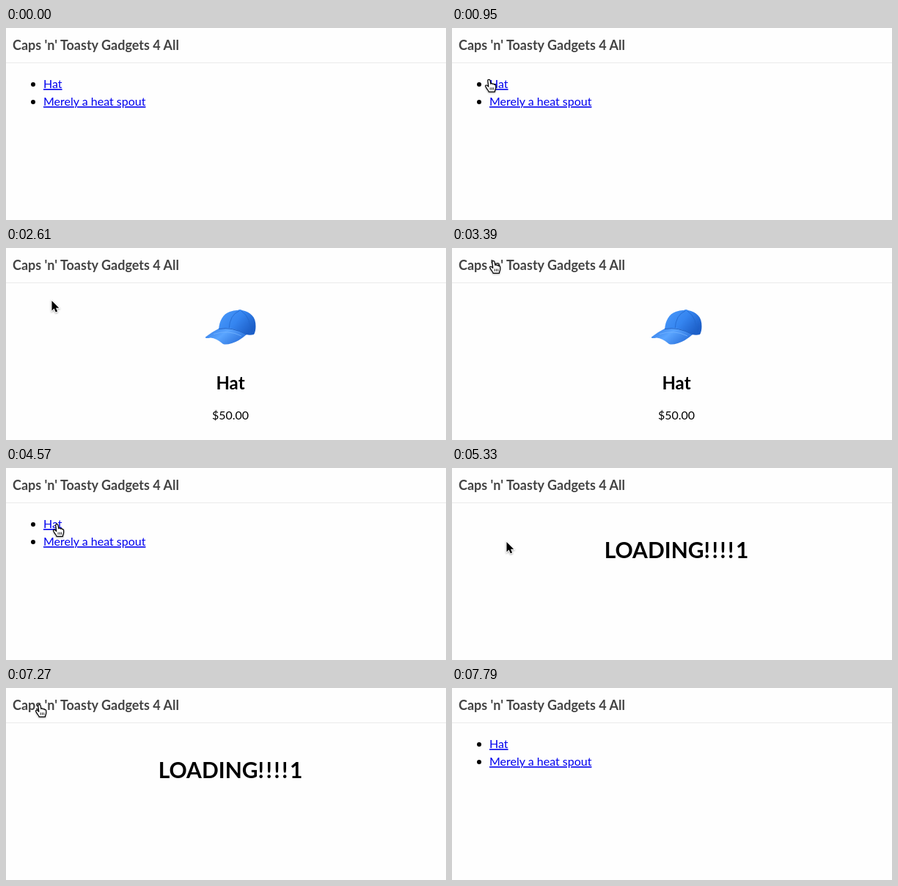
Recreate the animation shown at these times as an HTML page. Size 600 by 262 pixels, loop 9070 ms.

```html
<!DOCTYPE html>
<html lang="en">
<head>
<meta charset="utf-8">
<title>Shop</title>
<style>
  html, body { margin: 0; width: 100%; height: 100%; overflow: hidden; background: #fefefe; }
  svg { display: block; width: 600px; height: 262px; }
  text { font-family: Lato, sans-serif; font-size: 16px; }
  .title { font-size: 18px; font-weight: 700; fill: #444; }
  .link { fill: #00e; text-decoration: underline 1px; text-underline-offset: 1px; text-decoration-skip-ink: none; }
  .mid { text-anchor: middle; }
  .h1 { font-size: 30px; font-weight: 700; }
  .h2 { font-size: 24px; font-weight: 700; }
  .loose { letter-spacing: .08em; }
  #arrow, #hand { filter: drop-shadow(0 1px .8px rgba(0, 0, 0, .35)); }
  [hidden] { display: none; }
</style>
</head>
<body>
<svg viewBox="0 0 600 262">
  <defs>
    <linearGradient id="crown" x1="0" y1="0" x2="1" y2=".6">
      <stop offset="0" stop-color="#4c9bfa"/>
      <stop offset=".55" stop-color="#3585f0"/>
      <stop offset="1" stop-color="#1d5fc8"/>
    </linearGradient>
    <linearGradient id="brim" x1="0" y1="0" x2="1" y2=".5">
      <stop offset="0" stop-color="#2f78e4"/>
      <stop offset=".5" stop-color="#5aa5ff"/>
      <stop offset="1" stop-color="#2d74de"/>
    </linearGradient>
    <linearGradient id="flame" x1="0" y1="0" x2="0" y2="1">
      <stop offset="0" stop-color="#e5402a"/>
      <stop offset=".6" stop-color="#f4552a"/>
      <stop offset="1" stop-color="#ff8b1f"/>
    </linearGradient>
    <radialGradient id="core" cx=".5" cy=".8" r=".7">
      <stop offset="0" stop-color="#fffbd8"/>
      <stop offset=".45" stop-color="#ffeb72"/>
      <stop offset="1" stop-color="#ffc62e"/>
    </radialGradient>
    <linearGradient id="green" x1="0" y1="0" x2="0" y2="1">
      <stop offset="0" stop-color="#83ea70"/>
      <stop offset=".3" stop-color="#62dc55"/>
      <stop offset="1" stop-color="#4fd04a"/>
    </linearGradient>
  </defs>

  <text class="title" x="9" y="30">Caps 'n' Toasty Gadgets 4 All</text>
  <path d="M0 47.5H600" stroke="#ebebeb"/>

  <g id="list">
    <circle cx="37" cy="77" r="3"/>
    <circle cx="37" cy="101" r="3"/>
    <text class="link" x="51" y="82">Hat</text>
    <text class="link" x="51" y="106">Merely a heat spout</text>
  </g>

  <g id="loading" hidden>
    <text class="mid h1" x="306" y="122.5">LOADING<tspan class="loose">!!!!</tspan>1</text>
  </g>

  <g id="cap" hidden>
    <path fill="url(#crown)" d="M290 111C291 99 296 90 305 87Q312 84.5 316 85Q319 83 322 85C333 87 341 94 340.5 107Q340.5 114 338 118Q333 119.5 327 118Q308 109 290 111Z"/>
    <path fill="none" stroke="#2367cc" stroke-width=".8" d="M318 86Q305 91 304 111M321 86Q335 95 333 118"/>
    <path fill="url(#brim)" d="M272 121.5Q280 115 290 110Q308 106 328 118Q318 127 308 130Q300 132.5 296 131Q287 123 279 122.5Q271 124 272 121.5Z"/>
    <path fill="none" stroke="#7ab8ff" stroke-width=".7" d="M283 117.5Q303 111 321 120"/>
    <path fill="none" stroke="#2162c4" d="M290 110.5Q308 107 328 118"/>
    <text class="mid h2" x="306" y="193">Hat</text>
    <text class="mid" x="306" y="234">$50.00</text>
  </g>

  <g id="spout" hidden>
    <path fill="url(#flame)" d="M271 143C253 143 243 132 243 117C243 107 247 103 248 98Q245 95 247 88Q252 91 253 101C257 94 266 88 268 71C280 78 287 88 286 101Q290 99 291 92C296 98 299 107 298.5 117C298 133 288 143 271 143Z"/>
    <path fill="none" stroke="#fefefe" stroke-width="1.3" d="M246 101Q250 97 252 90"/>
    <path fill="#ff8a20" d="M271 143C256 143 247 134 247 121C247 113 251 110 252 106Q256 109 257 112C259 104 270 99 270 86C278 93 281 101 280 111Q287 109 289 101C293 107 296 113 295 121C294 135 286 143 271 143Z"/>
    <path fill="#ffb128" d="M271 143C257 143 250 135 250 125Q250 119 253 116Q256 119 257 121C259 112 269 109 270 99Q277 107 277 118Q283 117 287 111Q292 116 292 125C292 136 285 143 271 143Z"/>
    <path fill="url(#core)" d="M271 143C260 143 254 137 254 130Q255 125 257 124Q261 127 263 127Q263 119 270 114Q275 119 276 126Q281 126 284 121Q288 126 287 131Q286 143 271 143Z"/>

    <path fill="none" stroke="#48c344" stroke-width="2.6" d="M334 102Q334 118 345 118Q352 118 355 112"/>
    <path fill="none" stroke="#b8bdb8" stroke-width="2.2" d="M346 103Q344 108 348 113"/>
    <path fill="url(#green)" d="M312 86Q312 84 315 84L361 83Q363 81.5 366 83H375Q379 84 379 89L378 97Q375 101 376 107L377 134Q377 138 373 138.5L359 139Q356 139 355.5 135L352 107Q351 102.5 346 102.5H323Q314 103 312 100Z"/>
    <path fill="none" stroke="#38b53c" d="M315 94.5H349L354 99H375M323 102.5H346Q351 102.5 352 107L355.5 135"/>
    <path fill="none" stroke="#a4f592" stroke-width="1.3" d="M315 86.5H372"/>
    <path fill="none" stroke="#42bf43" d="M358 108L361 134H373L372 108Z"/>
    <path fill="#d9622f" d="M308 84.5H313V100.5H308Q306.5 92 308 84.5Z"/>
    <path fill="#f58a4c" d="M309 87H311.5V93H309Z"/>
    <text class="mid h2" x="306" y="193">Merely a heat spout</text>
    <text class="mid" x="306" y="234">$500.00</text>
  </g>

  <g id="arrow" hidden>
    <path stroke="#fff" stroke-width="1.8" paint-order="stroke" d="M-.5 0V13.5L2.6 10.6L4.8 15.6L7.1 14.6L5 9.8H9.2Z"/>
  </g>
  <g id="hand" hidden>
    <g transform="translate(0 -1)" stroke="#000">
      <path fill="#fff" stroke-width="1.2" stroke-linejoin="round" d="M-2.2 2.2C-2.4 .2 .6 0 1 1.9L1.9 6.6C2.4 5.5 4.2 5.7 4.5 7C5.1 6.2 6.8 6.5 6.9 7.8C7.6 7.2 8.7 7.8 8.7 9V11.8C8.7 14.2 7.4 15 7.4 17.4H-.8C-1 15.6-3.2 14-4 12.2C-4.6 10.8-6 9.8-5.3 8.7C-4.5 7.7-2.6 8.6-1.2 10.4Z"/>
      <path fill="none" stroke-width=".9" d="M1.2 11.5V14.8M3.5 11.5V14.8M5.7 11.5V14.8"/>
    </g>
  </g>
</svg>
<script>
const LOOP = 9070;
const STEP = 57.5; // time between pointer positions
const LAG = 60;    // the pointer shape follows a page change a little late

const pages = [
  [0, 'list'], [1530, 'loading'], [2610, 'cap'], [3510, 'loading'], [3990, 'list'],
  [5270, 'loading'], [6350, 'spout'], [7270, 'loading'], [7790, 'list']
];

const entry = [-12, 64];
const moves = [
  { start: 660, steps: 10, to: [63, 72] },
  { start: 2850, steps: 4, to: [58, 19] },
  { start: 3390, steps: 1, to: [57, 18] },
  { start: 4340, steps: 10, to: [78, 97], bend: [60, 57] },
  { start: 5040, steps: 2, to: [75, 101] },
  { start: 6410, steps: 1, to: [73, 101] },
  { start: 6590, steps: 10, to: [46, 23] },
  { start: 7440, steps: 4, to: [-14, 42] }
];

const el = id => document.getElementById(id);
const show = (id, on) => el(id).toggleAttribute('hidden', !on);
const within = (v, a, b) => v >= a && v <= b;
const easeOut = k => 1 - (1 - k) ** 2;
const mix = (a, b, k) => a.map((v, i) => v + (b[i] - v) * k);
const pageAt = t => pages.findLast(([time]) => time <= Math.max(0, t))[1];

function pointerAt(t) {
  let pos = entry;
  for (const { start, steps, to, bend = mix(pos, to, .5) } of moves) {
    if (t < start) break;
    const step = Math.min(steps, Math.floor((t - start) / STEP) + 1);
    const k = easeOut(step / steps);
    pos = mix(mix(pos, bend, k), mix(bend, to, k), k);
  }
  return pos;
}

function overLink([x, y], page) {
  if (within(x, 9, 239) && within(y, 12, 34)) return true;
  if (page !== 'list') return false;
  return within(x, 51, 77) && within(y, 67, 86) || within(x, 51, 189) && within(y, 91, 110);
}

function draw(t) {
  const page = pageAt(t);
  for (const id of ['list', 'loading', 'cap', 'spout']) show(id, id === page);

  const pos = pointerAt(t);
  const hand = overLink(pos, pageAt(t - LAG));
  show('hand', hand);
  show('arrow', !hand);
  el(hand ? 'hand' : 'arrow').setAttribute('transform', `translate(${pos})`);
}

const start = performance.now();
function tick() {
  draw((performance.now() - start) % LOOP);
  requestAnimationFrame(tick);
}
tick();
</script>
</body>
</html>
```
